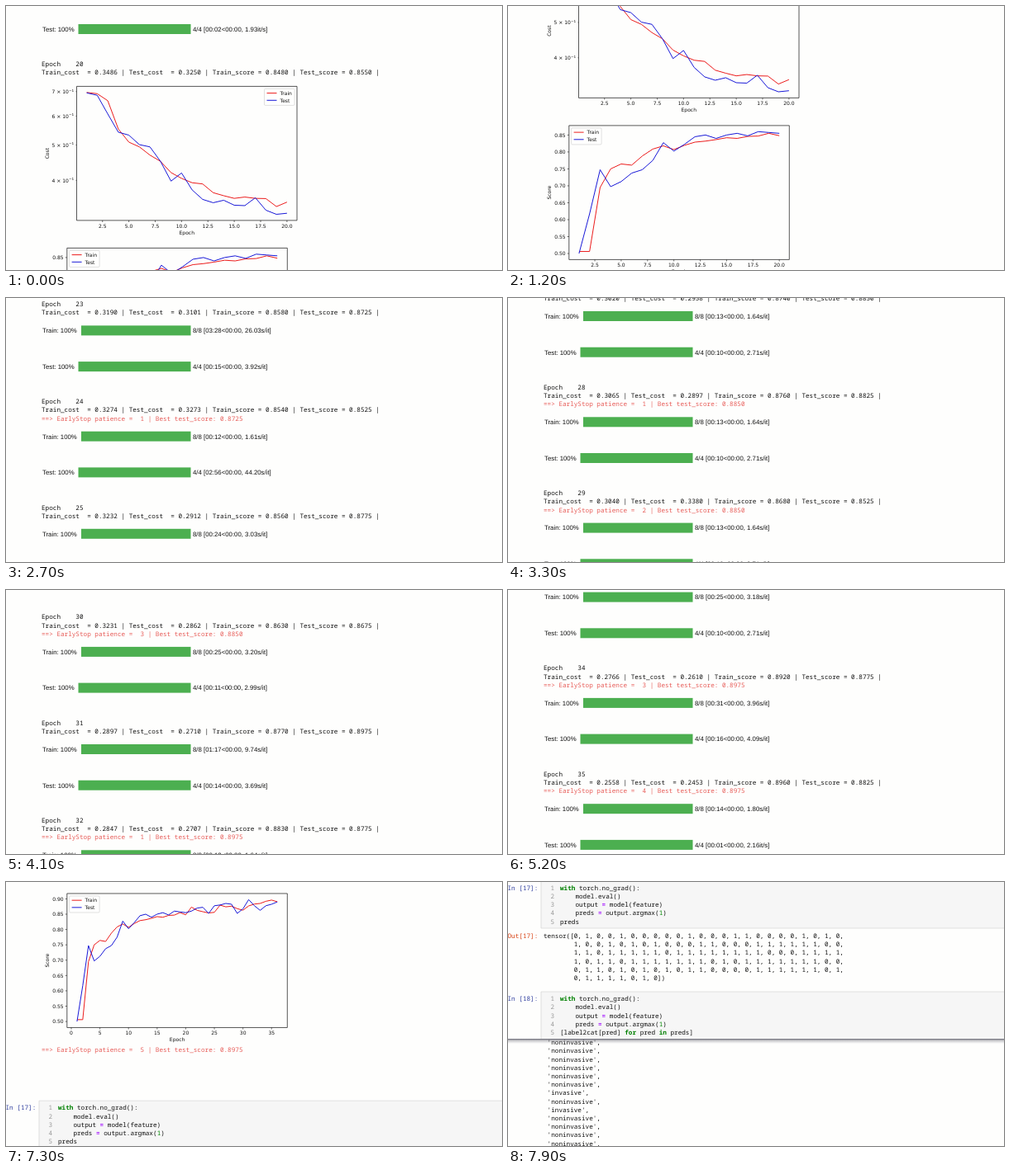
Animation of 600 by 320 pixels, one loop 8 s. Source, as an HTML page with a canvas:

```html
<!DOCTYPE html>
<html lang="en">
<head>
<meta charset="utf-8">
<title>Training log</title>
<style>
html, body { margin: 0; width: 100%; height: 100%; overflow: hidden; background: #fefefd; }
canvas { display: block; }
</style>
</head>
<body>
<canvas id="stage" width="600" height="320"></canvas>
<script>
const ctx = document.getElementById('stage').getContext('2d');
ctx.textRendering = 'geometricPrecision';

const W = 600, H = 320, LOOP = 8000, STEP = 100;
const PAPER = '#fefefd', RED = '#ec1c1c', BLUE = '#1818d8', WARN = '#e75c58';
const MONO = '7.67px "Noto Sans Mono", monospace';
const SANS = '7.8px "Liberation Sans", Arial, sans-serif';
const PLOT = '6px "DejaVu Sans", sans-serif';
const CHAR = 4.602, LINE = 10.2, TEXT_X = 43;

// Metrics per epoch, starting with epoch 1
const trainCost = [.6964, .691, .661, .553, .509, .494, .469, .451, .42, .405, .394, .391,
  .37, .363, .357, .36, .357, .3565, .339, .3486, .331, .338, .319, .3274,
  .3232, .304, .302, .3065, .304, .3231, .2897, .2847, .2739, .2766, .2558, .2625];
const testCost = [.6946, .684, .608, .542, .532, .501, .494, .451, .398, .419, .3766, .3547,
  .3473, .3528, .3419, .341, .3584, .3313, .3228, .325, .3285, .3118, .3101, .3273,
  .2912, .2897, .2958, .2897, .338, .2862, .271, .2707, .2958, .261, .2453, .2455];
const trainScore = [.506, .506, .695, .75, .7645, .761, .788, .8085, .818, .807, .8195, .829,
  .832, .8365, .842, .84, .846, .847, .855, .848, .873, .8625, .858, .854,
  .856, .8795, .874, .876, .868, .863, .877, .883, .885, .892, .896, .8905];
const testScore = [.5, .617, .7475, .6975, .7125, .7375, .7475, .775, .8275, .8025, .8225, .845,
  .85, .84, .85, .855, .8475, .86, .8575, .855, .86, .87, .8725, .8525,
  .8775, .88, .885, .8825, .8525, .8675, .8975, .8775, .8625, .8775, .8825, .89];

const trainTime = { 24: '03:28, 26.03s', 25: '00:12, 1.61s', 26: '00:24, 3.03s', 31: '00:25, 3.20s',
  32: '01:17, 9.74s', 34: '00:25, 3.18s', 35: '00:31, 3.96s', 36: '00:14, 1.80s' };
const testTime = { 20: '00:02, 1.93it', 24: '00:15, 3.92s', 25: '02:56, 44.20s', 31: '00:11, 2.99s',
  32: '00:14, 3.69s', 35: '00:16, 4.09s', 36: '00:01, 2.16it' };

const preds = ['010010000010001100001010', '100101010001100011111100', '110111110111111110001111',
  '101101111111010111111100', '011010101011000011111101', '01111010'];
const labels = [...preds.join('')].map(p => p === '1' ? "'noninvasive'" : "'invasive'");

const code = ['with torch.no_grad():', '    model.eval()', '    output = model(feature)',
  '    preds = output.argmax(1)'];

// [time, scroll offset]
const CELLS_Y = 2930;
const scrollKeys = [[0, 0], [600, 0], [1200, 148.5], [1400, 172], [1500, 172], [2100, 660], [2400, 660],
  [2700, 830], [3300, 1330], [3500, 1390], [3700, 1390], [4100, 1662], [4600, 1890], [4800, 1930],
  [4900, 1930], [5200, 2103], [5500, 2290], [5600, 2290], [6100, 2530], [7100, 2530],
  [7700, CELLS_Y], [LOOP, CELLS_Y]];

function scrollAt(t) {
  const i = scrollKeys.findIndex(k => k[0] > t);
  const [t0, a] = scrollKeys[i - 1], [t1, b] = scrollKeys[i];
  return a + (b - a) * (t - t0) / (t1 - t0);
}

function text(str, x, y, font, color = '#111', align = 'left') {
  ctx.font = font;
  ctx.fillStyle = color;
  ctx.textAlign = align;
  ctx.fillText(str, x, y);
}

// y is the middle of the capital letters
const mono = (str, x, y, color, weight = '') => text(str, x, y + 2.7, weight + MONO, color);
const small = (str, x, y, align) => text(str, x, y + 2.2, PLOT, '#111', align);

function line(points, color, width) {
  ctx.beginPath();
  points.forEach(([x, y]) => ctx.lineTo(x, y));
  ctx.strokeStyle = color;
  ctx.lineWidth = width;
  ctx.lineJoin = 'round';
  ctx.stroke();
}

function progress(name, count, time = '00:13, 1.64s', y) {
  const left = name === 'Train' ? 91 : 87.5;
  text(name + ': 100%', 44, y + 2.8, SANS);
  ctx.fillStyle = '#4caf50';
  ctx.fillRect(left, y - 6, 223.5 - left, 12);
  const [spent, rate] = time.split(', ');
  text(`${count}/${count} [${spent}<00:00, ${rate}/it]`.replace('it/it', 'it/s'), 226, y + 2.8, SANS);
}

function legend(x, y) {
  ctx.beginPath();
  ctx.roundRect(x, y, 36.5, 20, 1.2);
  ctx.fillStyle = '#fffc';
  ctx.fill();
  ctx.strokeStyle = '#ccc';
  ctx.lineWidth = .6;
  ctx.stroke();
  [['Train', RED], ['Test', BLUE]].forEach(([name, color], i) => {
    const rowY = y + 5.2 + i * 8.7;
    line([[x + 3, rowY], [x + 15, rowY]], color, 1);
    small(name, x + 19, rowY);
  });
}

function chart(left, top, title, train, test, log) {
  const width = 266.5, height = 162.5, bottom = top + height, n = train.length;
  const scale = log ? Math.log : v => v;
  const all = [...train, ...test].map(scale);
  const lo = Math.min(...all), hi = Math.max(...all);
  const px = e => left + width * (.5 + 10 * (e - 1) / (n - 1)) / 11;
  const py = v => bottom - height * (.5 + 10 * (scale(v) - lo) / (hi - lo)) / 11;
  const inside = y => y > top && y < bottom;

  const stepX = n > 20 ? 5 : 2.5;
  for (let e = 0; e <= n; e += stepX) {
    const x = px(e);
    if (x < left + 1) continue;
    line([[x, bottom], [x, bottom + 2.1]], '#111', .6);
    small(e.toFixed(n > 20 ? 0 : 1), x, bottom + 6.6, 'center');
  }
  if (log) {
    for (let m = 3; m <= 7; m++) {
      const y = py(m / 10);
      if (!inside(y)) continue;
      line([[left - 1.2, y], [left, y]], '#111', .5);
      small(m + ' × 10', left - 9.6, y, 'right');
      text('−1', left - 3.4, y - .2, PLOT.replace('6px', '4.2px'), '#111', 'right');
    }
  } else {
    for (let k = 10; k <= 18; k++) {
      const y = py(k / 20);
      if (!inside(y)) continue;
      line([[left - 2.1, y], [left, y]], '#111', .6);
      small((k / 20).toFixed(2), left - 4.2, y, 'right');
    }
  }
  small('Epoch', left + width / 2, bottom + 14.5, 'center');
  ctx.save();
  ctx.translate(50, top + height / 2);
  ctx.rotate(-Math.PI / 2);
  small(title, 0, 0, 'center');
  ctx.restore();

  [[train, RED], [test, BLUE]].forEach(([data, color]) =>
    line(data.map((v, i) => [px(i + 1), py(v)]), color, 1));
  ctx.strokeStyle = '#111';
  ctx.lineWidth = .7;
  ctx.strokeRect(left, top, width, height);
  legend(log ? left + width - 39.5 : left + 2.8, top + 3);
}

function patienceAt(epoch) {
  let best = 0, patience = 0;
  testScore.slice(0, epoch).forEach(s => {
    if (s > best) { best = s; patience = 0; } else patience++;
  });
  return [patience, best];
}

function trainingLog() {
  let y = 28;
  for (let e = 20; e <= 36; e++) {
    if (e > 20) {
      progress('Train', 8, trainTime[e], y);
      y += 43.7;
    }
    progress('Test', 4, testTime[e] || '00:10, 2.71s', y);
    y += 42.4;
    mono('Epoch    ' + e, TEXT_X, y);
    y += LINE;
    const [a, b, c, d] = [trainCost, testCost, trainScore, testScore].map(m => m[e - 1].toFixed(4));
    mono(`Train_cost  = ${a} | Test_cost  = ${b} | Train_score = ${c} | Test_score = ${d} |`, TEXT_X, y);
    if (e === 20 || e === 36) {
      const top = y + 16.8;
      chart(85.5, top, 'Cost', trainCost.slice(0, e), testCost.slice(0, e), true);
      chart(73.8, top + 196, 'Score', trainScore.slice(0, e), testScore.slice(0, e), false);
      y = top + 375.5;
    }
    const [patience, best] = patienceAt(e);
    if (patience) {
      y += LINE;
      mono(`==> EarlyStop patience =  ${patience} | Best test_score: ${best.toFixed(4)}`, TEXT_X, y, WARN);
    }
    y += 21.8;
  }
}

function codeCell(number, lastLine, y) {
  ctx.fillStyle = '#f6f6f6';
  ctx.fillRect(40, y - 8.5, W, 57.5);
  ctx.strokeStyle = '#cfcfcf';
  ctx.lineWidth = .6;
  ctx.strokeRect(40, y - 8.5, W, 57.5);
  mono(`In [${number}]:`, -.5, y, '#303f9f');
  [...code, lastLine].forEach((str, i) => {
    const rowY = y + i * LINE;
    mono(String(i + 1), 51.5, rowY, '#999');
    for (const m of str.matchAll(/\b(with|for|in)\b|=|\b\d+\b|\S+?(?=\b(?:\d+\b)|\s|$)/g)) {
      const keyword = Boolean(m[1]), operator = m[0] === '=';
      const color = keyword ? '#008000' : operator ? '#aa22ff' : /^\d+$/.test(m[0]) ? '#008800' : '#111';
      mono(m[0], 63 + m.index * CHAR, rowY, color, keyword || operator ? 'bold ' : '');
    }
  });
}

function labelList(firstY) {
  labels.forEach((label, i) => {
    const y = firstY + i * LINE;
    if (y > 180 && y < H + 10) mono((i ? ' ' : '[') + label + ',', TEXT_X, y);
  });
}

function cells() {
  codeCell(17, 'preds', 7);
  mono('Out[17]:', -.5, 65.3, '#d84315');
  preds.forEach((row, i) => {
    const end = i === preds.length - 1 ? '])' : ',';
    mono((i ? ' '.repeat(8) : 'tensor([') + [...row].join(', ') + end, TEXT_X, 65.3 + i * LINE);
  });
  codeCell(18, '[label2cat[pred] for pred in preds]', 141.5);
}

// The code stays pinned above while the long output runs underneath
function pinnedOutput() {
  ctx.save();
  ctx.beginPath();
  ctx.rect(0, 190, W, H - 190);
  ctx.clip();
  ctx.fillStyle = PAPER;
  ctx.fillRect(0, 190, W, H - 190);
  labelList(194.4 - 78 * LINE);
  const shade = ctx.createLinearGradient(0, 190, 0, 196);
  shade.addColorStop(0, 'rgba(70,70,85,.85)');
  shade.addColorStop(.35, 'rgba(110,110,120,.4)');
  shade.addColorStop(1, 'rgba(140,140,150,0)');
  ctx.fillStyle = shade;
  ctx.fillRect(0, 190, W, 6);
  ctx.restore();
}

function draw(t) {
  const scroll = scrollAt(t);
  ctx.fillStyle = PAPER;
  ctx.fillRect(0, 0, W, H);
  ctx.save();
  ctx.translate(0, -scroll);
  trainingLog();
  ctx.translate(0, CELLS_Y);
  if (t > 7000) {
    cells();
    if (t < 7900) {
      mono('Out[18]:', -.5, 199.8, '#d84315');
      labelList(199.8);
    }
  }
  ctx.restore();
  if (t >= 7900) pinnedOutput();
}

function frame() {
  draw(Math.floor(performance.now() % LOOP / STEP) * STEP);
  requestAnimationFrame(frame);
}
frame();
</script>
</body>
</html>
```
